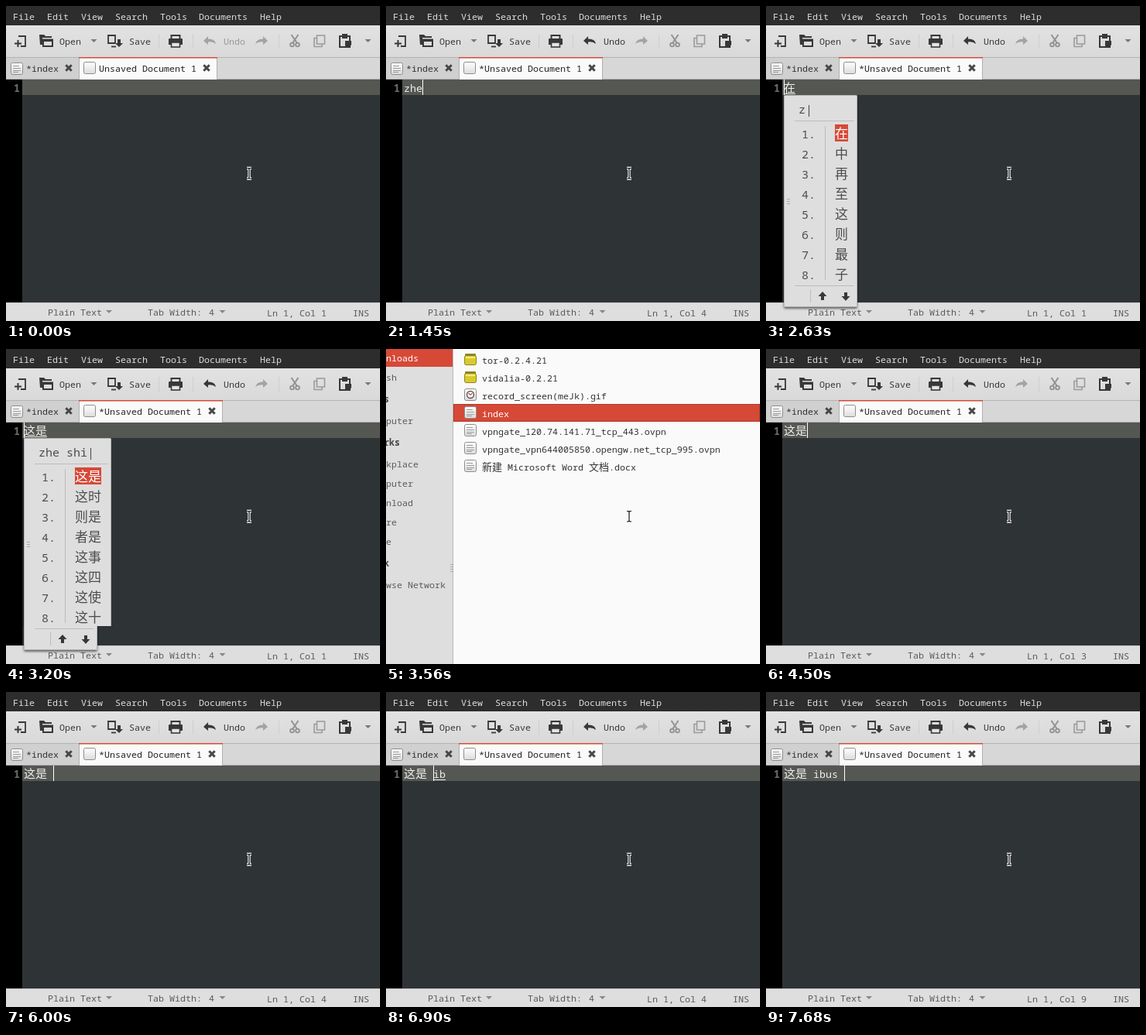
An HTML page for the animation above (8000 ms loop, 483 by 407 pixels).

```html
<!DOCTYPE html>
<html lang="zh-CN">
<head>
<meta charset="utf-8">
<title>Typing with an input method</title>
<style>
  html, body { margin: 0; width: 100%; height: 100%; overflow: hidden; background: #2e3436; }
  svg { display: block; width: 100vw; height: 100vh; }
  text { font-family: 'Noto Sans Mono', 'Noto Sans CJK SC', 'Noto Sans CJK', monospace; white-space: pre; }
</style>
</head>
<body>
<svg id="stage" viewBox="0 0 483 407">
  <defs>
    <linearGradient id="bar" x2="0" y2="1"><stop stop-color="#e2e2e2"/><stop offset="1" stop-color="#d9d9d9"/></linearGradient>
    <linearGradient id="icon" x2="0" y2="1"><stop stop-color="#fff"/><stop offset="1" stop-color="#dcdcdc"/></linearGradient>
    <filter id="shadow" x="-20%" y="-10%" width="140%" height="120%">
      <feDropShadow dx="0" dy="2" stdDeviation="1.6" flood-color="#000" flood-opacity=".55"/>
    </filter>
    <clipPath id="stale"><path d="M0 95H136V358H0z"/></clipPath>
  </defs>
  <g id="view"></g>
</svg>
<script>
const LOOP = 8000, UI = 35 / 3, CODE = 40 / 3;
const RED = '#d64937', DARK = '#383838', DIM = '#a3a3a3', PANEL = '#dedede';
const CJK = /[\u2e80-\u9fff]/;

const rect = (x, y, w, h, fill, more = '') =>
  `<rect x="${x}" y="${y}" width="${w}" height="${h}" fill="${fill}" ${more}/>`;
const fillPath = (d, fill) => `<path d="${d}" fill="${fill}"/>`;
const line = (d, color, w = 1) => `<path d="${d}" fill="none" stroke="${color}" stroke-width="${w}"/>`;
const label = (x, y, s, fill, size = UI, more = '') =>
  `<text x="${x}" y="${y}" font-size="${size}" fill="${fill}" ${more}>${s}</text>`;

const width = (s, size, wide) => [...s].reduce((w, c) => w + (CJK.test(c) ? wide : size * 0.6), 0);

// Latin and Chinese runs have different sizes
function mixed(x, y, s, fill, size, wide) {
  let out = '';
  for (const run of s.match(/[\u2e80-\u9fff]+|[^\u2e80-\u9fff]+/g) || []) {
    out += label(x, y, run, fill, CJK.test(run) ? wide : size);
    x += width(run, size, wide);
  }
  return out;
}

const drop = (x, y, c) => fillPath(`M${x - 4} ${y - 2}h8l-4 4z`, c);
const cross = (x, y) => line(`M${x - 3.7} ${y - 3.7}l7.4 7.4m0 -7.4l-7.4 7.4`, '#474747', 3);
const sheet = (x, y, lines, size = 15) =>
  rect(x + .5, y + .5, size, size, 'url(#icon)', 'rx="2" stroke="#8d8d8d"') +
  (lines ? line(`M${x + 3} ${y + 4.5}h8m-8 3h10m-10 3h10m-10 2h7`, '#9a9a9a') : '');
const grip = (x, y, n) => {
  let d = '';
  for (let i = 0; i < n; i++) d += `M${x} ${y + i * 3 + .5}h4`;
  return line(d, '#a8a8a8');
};

function toolbar(edited) {
  const undo = edited ? DARK : DIM;
  return rect(0, 25, 483, 41, 'url(#bar)') +
    line('M197.5 36V55M241.5 36V55M352.5 36V55', '#cfcfcf') +
    // new
    line('M16 39H25V52H19', DARK, 1.8) + line('M11 48.5H20M15.5 44V53', DARK, 2) +
    // open
    fillPath('M43 37H49L51 39H59V41H47V50H44z', DARK) +
    line('M48 43.5H60V52H48z', DARK, 2) + fillPath('M48 43H60V46H48z', DARK) +
    label(69, 50, 'Open', DARK) + drop(113.5, 45, '#777') +
    // save
    line('M132 38H141V48H132z', DARK, 1.8) + line('M136 52.5H142', DARK, 1.8) +
    fillPath('M144 43H148V48H151L146 53L141 48H144z', DARK) +
    label(159, 50, 'Save', DARK) +
    // print
    line('M213.5 42V38H224.5V42', DARK, 2) +
    fillPath('M211 42H227Q228 42 228 43V50H210V43Q210 42 211 42z', DARK) +
    rect(213.5, 47, 11, 6, '#e4e4e4', `stroke="${DARK}" stroke-width="1.6"`) +
    // undo, redo
    fillPath('M255 45L261 39V42.5Q270 42 271 49Q267 45.500 261 46.500V50z', undo) +
    label(281, 50, 'Undo', edited ? DARK : '#999') +
    fillPath('M338 45L332 39V42.5Q324 42 322 49Q326 45.500 332 46.500V50z', DIM) +
    // cut
    line('M368.500 37L376 48M377.500 37L370 48', '#929292', 2) +
    '<g fill="none" stroke="#929292" stroke-width="1.8"><circle cx="369.500" cy="50" r="2.400"/><circle cx="376.500" cy="50" r="2.400"/></g>' +
    // copy
    line('M401.500 38H411.500V49H401.500zM401 41.500H398V52.500H408V49', '#9b9b9b', 1.6) +
    // paste
    line('M431 39H444V53H431z', DARK, 2) + fillPath('M434 36H441V42H434z', DARK) +
    fillPath('M438 45H446V50L443 54H438z', DARK) +
    drop(467.5, 45, '#777');
}

function tabs(edited) {
  const title = (edited ? '*' : '') + 'Unsaved Document 1';
  const end = 147 + title.length * 7;
  return rect(0, 66, 483, 29, '#d7d7d7') + rect(0, 66, 94, 29, '#d0d0d0') +
    line('M0 66.5H483', '#b4b4b4') + line('M0 94.5H483', '#b0b0b0') +
    sheet(6, 73, true) + label(26, 85, '*index', '#333') + cross(81, 80) +
    rect(94, 66, end - 94, 29, '#fafafa') +
    line(`M94.5 66V95M${end - .5} 66V95`, '#b0b0b0') + rect(94, 66, end - 94, 1.5, RED) +
    sheet(100, 72, false) + label(120, 85, title, '#222') + cross(end - 14, 80);
}

function statusbar(col) {
  const c = '#5a5a5a';
  return rect(0, 383, 483, 24, PANEL) + line('M0 383.5H483', '#c4c4c4') +
    label(54, 400, 'Plain Text', c) + drop(133, 395, '#888') +
    label(183, 400, 'Tab Width:', c) + label(262, 400, '4', c) + drop(279.5, 395, '#888') +
    label(337, 401, `Ln 1, Col ${col}`, c) + label(448, 401, 'INS', c);
}

function editor(s) {
  const x = 23 + width(s.text, CODE, 15);
  const preWidth = width(s.pre, CODE, 15);
  const ink = '#eeeeec';
  return rect(0, 95, 483, 288, '#2e3436') + rect(21, 95, 462, 20, '#555753') + rect(0, 95, 21, 288, '#000') +
    label(10, 111, '1', '#6c6e6a', CODE, 'font-weight="700"') +
    mixed(23, 111, s.text, ink, CODE, 15) + mixed(x, 111, s.pre, ink, CODE, 15) +
    (s.pre ? rect(x, 113, preWidth, 1, ink) : '') +
    (s.caret ? rect(x, 95, 1, 20, '#fff') : '');
}

function panel(right, s) {
  const list = s.list.split(' ');
  const foot = right - 61, edge = right - 4.5, ink = '#4d4d4d';
  const arrow = (x, dir) => fillPath(
    `M${x} ${375 - 6 * dir}l5.500 ${6 * dir}h-3.500v${5 * dir}h-4v${-5 * dir}h-3.500z`, DARK);
  let out = `<g filter="url(#shadow)">${rect(23.5, 115.5, right - 24, 273, PANEL, 'stroke="#b5b5b5" rx="1"')}</g>` +
    grip(27, 249, 3) + label(42, 139, s.input + '|', ink, 15) +
    line(`M37 148.5H${edge}M76.5 155V354M37 361.5H${edge}M${foot + .5} 366V383`, '#bcbcbc') +
    arrow(foot + 16, 1) + arrow(foot + 46, -1) +
    rect(89, 153, list[0].length * 17, 22, RED);
  list.forEach((word, i) => {
    const y = 171 + i * 26;
    out += label(46, y, `${i + 1}.`, ink, 15) + label(89, y, word, i ? ink : '#fff', 17);
  });
  return out;
}

function popup(s) {
  if (!s.input) return '';
  const wide = s.list.split(' ')[0].length > 1;
  const body = !wide ? panel(118, s)
    : s.stale ? panel(118, s) + `<g clip-path="url(#stale)">${panel(136, s)}</g>`
    : panel(136, s);
  return `<g opacity="${s.fade}">${body}</g>`;
}

function files() {
  const side = [['sh', 41], ['s', 69, 1], ['puter', 97], ['rks', 125, 1], ['kplace', 153], ['puter', 178],
    ['nload', 203], ['re', 228], ['e', 253], ['k', 281, 1], ['wse Network', 309]];
  const names = ['tor-0.2.4.21', 'vidalia-0.2.21', 'record_screen(meJk).gif', 'index',
    'vpngate_120.74.141.71_tcp_443.ovpn', 'vpngate_vpn644005850.opengw.net_tcp_995.ovpn',
    '新建 Microsoft Word 文档.docx'];
  let out = rect(0, 0, 483, 407, '#fafafa') + rect(0, 0, 87, 407, PANEL) + line('M86.5 0V407', '#b8b8b8') +
    rect(0, 0, 86, 23, RED) + label(0, 16, 'nloads', '#fff') + grip(83, 278, 4);
  for (const [s, y, bold] of side)
    out += label(bold ? -3 : 0, y, s, bold ? '#444' : '#5c5c5c', UI, bold ? 'font-weight="700"' : '');
  out += rect(87, 71, 396, 23, RED) +
    rect(87.5, 71.5, 395, 22, 'none', 'stroke="#8c2a1e" stroke-dasharray="1 1"');
  names.forEach((s, i) => {
    const y = 5 + i * 23;
    if (i < 2) out += rect(102, y + 1, 14, 5, '#8d8420', 'rx="1"') +
      rect(101.5, y + 3.5, 15, 12, '#d9ca2e', 'rx="2" stroke="#8d8420"') + rect(103, y + 5, 12, 2, '#f2ea8c');
    else out += sheet(101, y, i > 2);
    if (i === 2) out += `<circle cx="109" cy="${y + 8}" r="4.500" fill="#fff" stroke="#555" stroke-width="1.400"/>` +
      line(`M106.500 ${y + 6}l2.500 2.500l2.500 -2.500`, RED, 1.2);
    out += mixed(124, y + 14, s, i === 3 ? '#fff' : '#333', UI, 13);
  });
  return out;
}

function pointer() {
  const d = 'M311 209.500H313L314 210.500L315 209.500H317M314 210.500V222M311 223H313L314 222L315 223H317';
  return line(d, '#fff', 3.4) + line(d, '#111', 1.2);
}

function menu() {
  const items = [['File', 9], ['Edit', 53], ['View', 97], ['Search', 141], ['Tools', 199], ['Documents', 249], ['Help', 328]];
  return rect(0, 0, 483, 25, '#2d2d2d') + items.map(([s, x]) => label(x, 18, s, '#dedede')).join('');
}

const Z = '在 中 再 至 这 则 最 子', ZH = '中 这 至 只 者 着 之 主', ZHE = '这 者 着 折 哲 浙 遮 辙';
const ZHES = '这是 这时 这三 这事 这四 这说 这色 这岁', ZHESHI = '这是 这时 则是 者是 这事 这四 这使 这十';

// Each step changes part of the state
const steps = [
  [0, { text: '', pre: '', col: 1, caret: false, edited: false, input: '', list: '', stale: false, fade: 1, files: false }],
  [420, { caret: true }],
  [1350, { text: 'z', col: 2, edited: true }],
  [1400, { text: 'zh', col: 3 }],
  [1450, { text: 'zhe', col: 4 }],
  [2000, { text: 'zh', col: 3 }],
  [2130, { text: 'z', col: 2 }],
  [2260, { text: '', col: 1 }],
  [2590, { pre: '在', input: 'z', list: Z, fade: .6 }],
  [2630, { fade: 1 }],
  [2900, { input: 'zh' }],
  [2940, { pre: '中', list: ZH }],
  [3080, { pre: '这', input: 'zhe', list: ZHE }],
  [3120, { pre: '这是', input: 'zhe s', list: ZHES, stale: true }],
  [3160, { input: 'zhe sh' }],
  [3200, { input: 'zhe shi', list: ZHESHI }],
  [3560, { files: true }],
  [3600, { files: false, stale: false }],
  [4460, { text: '这是', pre: '', col: 3, fade: .5 }],
  [4500, { input: '', fade: 1 }],
  [6000, { text: '这是 ', col: 4 }],
  [6500, { pre: 'i' }],
  [6900, { pre: 'ib' }],
  [7110, { pre: 'ibu' }],
  [7240, { pre: 'ibus' }],
  [7400, { text: '这是 ibus', pre: '', col: 8 }],
  [7680, { text: '这是 ibus ', col: 9 }]
];

const view = document.getElementById('view');
let shown = -1;

function draw(t) {
  const n = steps.filter(([at]) => at <= t).length;
  if (n === shown) return;
  shown = n;
  const s = Object.assign({}, ...steps.slice(0, n).map(step => step[1]));
  view.innerHTML = (s.files ? files()
    : menu() + toolbar(s.edited) + tabs(s.edited) + editor(s) + statusbar(s.col) + popup(s)) + pointer();
}

const start = performance.now();
function tick() {
  draw((performance.now() - start) % LOOP);
  requestAnimationFrame(tick);
}
tick();
</script>
</body>
</html>
```
